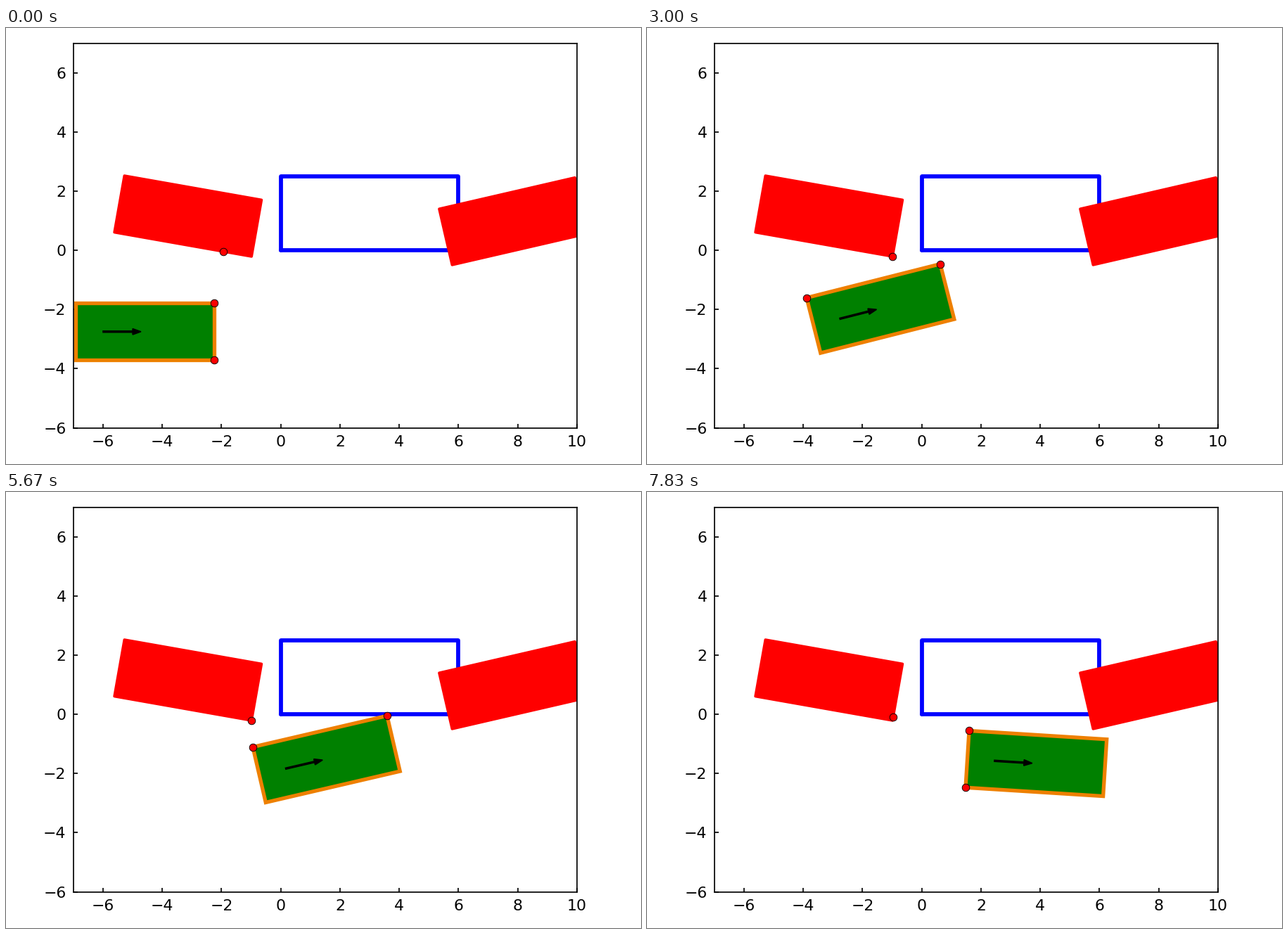
Animation, 903 px wide and 620 px high, one loop 8 s. Source, as a matplotlib script:

```python
import numpy as np
import matplotlib.pyplot as plt
from matplotlib.animation import FuncAnimation
from matplotlib.patches import FancyArrow, Polygon

W, H, DPI = 903, 620, 128
PX = 72 / DPI                     # one pixel in points
LOOP, TICK = 8000, 40             # ms
STEPS, LEAD = 48, 34              # poses per loop, rounding of their start (ms)

CAR = np.array([4.655, 1.924])
PARKED = np.array([4.70, 1.94])
REAR = 0.915                      # rear axle to rear end
START = np.array([-6.0, -2.75])

# (step, heading in degrees) where the steering changes
TURNS = [(0, 0), (2, 3.4), (6, 5.1), (8, 9.4), (16, 10.4), (18, 14.2),
         (22, 5.95), (27, 6), (30, 12.3), (36, 13.5), (39, 7.72),
         (42, 5.4), (47, -3.6)]
# (step, distance driven) where the speed changes
DRIVE = [(0, 0), (14, 2.56), (22, 3.978), (39, 7.186), (47, 8.554)]


def drive():
    """Rear axle positions and headings, rolled out along the heading."""
    steps = np.arange(STEPS)
    heading = np.interp(steps, *np.transpose(TURNS))
    moved = np.diff(np.interp(steps, *np.transpose(DRIVE)))
    mid = np.radians((heading[1:] + heading[:-1]) / 2)
    track = np.cumsum(moved * [np.cos(mid), np.sin(mid)], axis=1).T
    return START + np.vstack([(0, 0), track]), heading


def rotation(deg):
    a = np.radians(deg)
    return np.array([[np.cos(a), -np.sin(a)], [np.sin(a), np.cos(a)]])


def box(center, deg, size):
    """Corners: rear left, front left, front right, rear right."""
    signs = np.array([(-1, 1), (1, 1), (1, -1), (-1, -1)])
    return center + (signs * size / 2) @ rotation(deg).T


def nearest(point, center, deg):
    """Closest point of a parked car to the given point."""
    rot = rotation(deg)
    local = rot.T @ (point - center)
    return center + rot @ np.clip(local, -PARKED / 2, PARKED / 2)


def contact_points(corners, ahead):
    """Nearest point of the first parked car and the facing side's ends."""
    rear_l, front_l, front_r, rear_r = corners
    corner = box(*SPOTS[0], PARKED)[2]
    along = (corner - rear_l) @ ahead
    if along > CAR[0]:
        return [nearest(front_l, *SPOTS[0]), front_l, front_r]
    if along < 0:
        return [nearest(rear_l, *SPOTS[0]), rear_l, rear_r]
    return [corner, rear_l, front_l]


SPOTS = [(np.array([-3.133, 1.155]), -10), (np.array([7.858, 0.981]), 13)]
POSITIONS, HEADINGS = drive()

fig = plt.figure(figsize=(W / DPI, H / DPI), dpi=DPI, facecolor="white")
ax = fig.add_axes([95.9 / W, 51.45 / H, 716 / W, 547 / H])
ax.set_xlim(-7, 10)
ax.set_ylim(-6, 7)
ax.set_xticks(range(-6, 11, 2))
ax.set_yticks(range(-6, 7, 2))
ax.tick_params(direction="in", length=6 * PX, width=1.7 * PX,
               pad=10.5 * PX, labelsize=22 * PX)
for spine in ax.spines.values():
    spine.set_linewidth(1.7 * PX)

ax.plot([0, 6, 6, 0, 0], [0, 0, 2.5, 2.5, 0], color="blue", lw=5.8 * PX,
        solid_joinstyle="round", solid_capstyle="round", zorder=1)
for center, deg in SPOTS:
    ax.add_patch(Polygon(box(center, deg, PARKED), color="red",
                         lw=3.8 * PX, joinstyle="round", zorder=1.5))

car = ax.add_patch(Polygon(box(START, 0, CAR), facecolor="green",
                           edgecolor="#ee8000", lw=5.3 * PX,
                           joinstyle="miter", zorder=1.6))
arrow = ax.add_patch(FancyArrow(0, 0, 1, 0, width=0.045, head_width=0.2,
                                head_length=0.28, color="black",
                                lw=1.6 * PX, zorder=1.7))
dots, = ax.plot([], [], "o", color="red", ms=10.6 * PX, mec="black",
                mew=0.9 * PX, zorder=2)


def update(frame):
    step = int((frame * TICK + LEAD) * STEPS / LOOP)
    pos, deg = POSITIONS[step], HEADINGS[step]
    ahead = rotation(deg)[:, 0]
    corners = box(pos + ahead * (CAR[0] / 2 - REAR), deg, CAR)
    car.set_xy(corners)
    arrow.set_data(x=pos[0], y=pos[1], dx=ahead[0], dy=ahead[1])
    dots.set_data(*np.transpose(contact_points(corners, ahead)))
    return car, arrow, dots


anim = FuncAnimation(fig, update, frames=LOOP // TICK, interval=TICK,
                     repeat=True, repeat_delay=0, blit=False)
plt.show()
```
